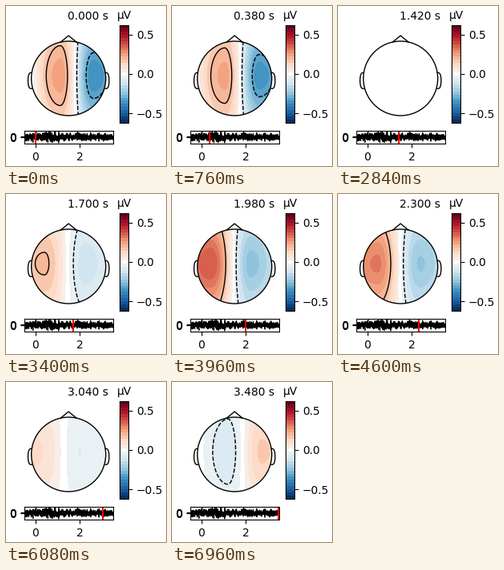
A matplotlib script that plays this animation: 200x200 px, repeating every 7000 ms.

```python
import numpy as np
import matplotlib.pyplot as plt
from matplotlib.animation import FuncAnimation
from matplotlib.colors import ListedColormap
from matplotlib.patches import Circle

FRAMES, STEP_MS = 175, 40
DT = 0.02                      # seconds of signal per frame
VMAX = 0.622
LEVELS = 0.18 + 0.245 * np.arange(-3, 3)
CX, CY, R = 78.2, 90.5, 46.5   # head, in pixels

plt.rcParams.update({"font.family": "DejaVu Sans", "font.size": 10})
fig = plt.figure(figsize=(2, 2), dpi=100, facecolor="white")

shades = plt.get_cmap("RdBu_r")(np.linspace(0, 1, 31))
shades[15] = 1                 # pure white around zero
cmap = ListedColormap(shades)

gx = np.linspace(CX - R, CX + R, 94)
gy = np.linspace(CY - R, CY + R, 94)


def wave(peak, trough, high, low):
    """Potential with one crest and one trough, broader outside the pair."""
    u = (gx - peak) / (trough - peak)
    inner = np.clip(u, 0, 1)
    phase = np.pi * (inner + (u - inner) / 2)
    row = (high + low) / 2 + (high - low) / 2 * np.cos(phase)
    return row / (1 + 0.6 * ((gy - 87) / R)[:, None] ** 2)


# Key moments: time -> crest x, trough x, crest value, trough value
keys = {
    0.00: (68, 109, 0.25, -0.38),
    0.38: (66, 109, 0.24, -0.37),
    0.90: (43, 84, 0.74, -0.40),
    1.42: (48, 98, 0.00, 0.00),
    1.98: (48, 98, 0.38, -0.24),
    2.60: (50, 105, 0.25, -0.22),
    3.48: (112, 70, 0.15, -0.095),
}
times = np.array(list(keys))
waves = [wave(*k) for k in keys.values()]


def field(t):
    k = min(np.searchsorted(times, t, side="right"), len(times) - 1)
    u = np.clip((t - times[k - 1]) / (times[k] - times[k - 1]), 0, 1)
    ease = u * u * (3 - 2 * u)
    return waves[k - 1] * (1 - ease) + waves[k] * ease


def box(left, top, right, bottom):
    return fig.add_axes([left / 200, 1 - bottom / 200,
                         (right - left) / 200, (bottom - top) / 200])


# Head
ax = box(0, 0, 200, 200)
ax.axis("off")
image = ax.imshow(field(0), cmap=cmap, vmin=-VMAX, vmax=VMAX, aspect="auto",
                  extent=(CX - R, CX + R, CY + R, CY - R),
                  interpolation="bilinear")
ax.set(xlim=(0, 200), ylim=(200, 0))
disc = Circle((CX, CY), R, transform=ax.transData)
image.set_clip_path(disc)
ax.add_patch(Circle((CX, CY), R, fill=False, ec="k", lw=1, zorder=4))


def outline(x, y):
    ax.plot(CX + R * np.array(x), CY - R * np.array(y), "k", lw=1, zorder=4)


nose = np.deg2rad(12)
outline([-nose, 0, nose], [0.978, 1.15, 0.978])
turn = np.linspace(-np.pi / 2, np.pi / 2, 30)
ear_x = 0.99 + 0.1 * np.abs(np.cos(turn)) ** 0.6
ear_y = -0.06 + 0.215 * np.sin(turn)
outline(ear_x, ear_y)
outline(-ear_x, ear_y)
label = ax.text(102.5, 17, "", ha="center", va="baseline")

# Colour scale
cax = box(142, 24, 153, 146)
cax.imshow(np.linspace(VMAX, -VMAX, 310)[:, None], cmap=cmap, aspect="auto",
           vmin=-VMAX, vmax=VMAX, extent=(0, 1, -VMAX, VMAX),
           interpolation="nearest")
cax.set_xticks([])
cax.yaxis.tick_right()
cax.set_yticks([-0.5, 0, 0.5])
cax.set_title("µV", fontsize=10)

# Signal strip
tax = box(23, 155.5, 134, 172)
rng = np.random.default_rng(4)
ts = np.linspace(-0.5, 3.5, 1000)
burst = 1.9 + 1.2 * np.exp(-((ts - 0.7) / 0.25) ** 2)
for _ in range(3):
    noise = np.convolve(rng.normal(size=1004), np.ones(5) / 5, "valid")
    tax.plot(ts, noise / noise.std() * burst, "k", lw=0.8)
tax.set(xlim=(-0.5, 3.5), ylim=(-8.25, 8.25), xticks=[0, 2])
tax.set_yticks([-0.4, 0, 0.4], ["0"] * 3)
cursor = tax.axvline(0, color="r", lw=1.5, zorder=2.4)

lines = []


def draw(i):
    t = i * DT
    z = field(t)
    image.set_data(z)
    while lines:
        lines.pop().remove()
    inside = LEVELS[(LEVELS > z.min()) & (LEVELS < z.max())]
    if inside.size:
        cs = ax.contour(gx, gy, z, inside, colors="k", linewidths=1, zorder=3)
        cs.set_clip_path(disc)
        lines.append(cs)
    label.set_text(f"{t:.3f} s")
    cursor.set_xdata([t, t])
    return [image, label, cursor]


anim = FuncAnimation(fig, draw, frames=FRAMES, interval=STEP_MS,
                     repeat=True, repeat_delay=0, blit=False)
plt.show()
```
